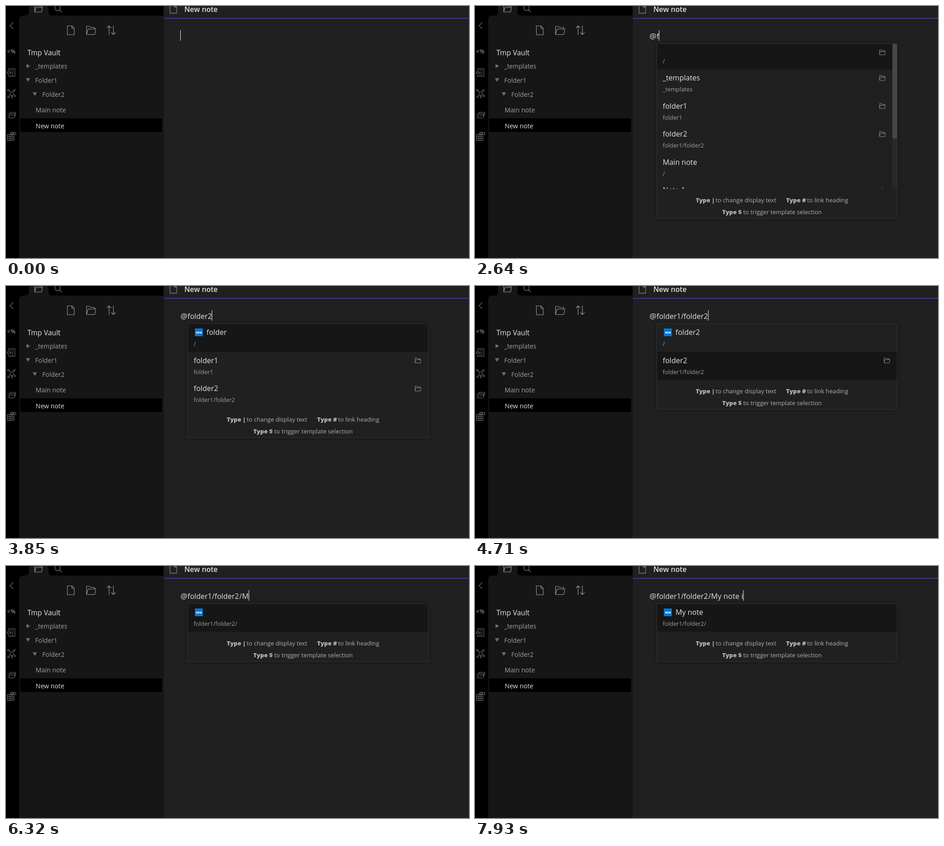
Animation of 1015 by 552 pixels, one loop 8 s. Source, as an HTML page with a canvas:

```html
<!DOCTYPE html>
<html lang="en">
<head>
<meta charset="utf-8">
<title>Note link suggestions</title>
<style>
html, body { margin: 0; width: 100%; height: 100%; overflow: hidden; background: #202020; }
canvas { display: block; }
</style>
</head>
<body>
<canvas id="stage" width="1015" height="552"></canvas>
<script>
const ctx = document.getElementById('stage').getContext('2d');
const FONT = '"Open Sans", "Noto Sans", sans-serif';
const LOOP = 8000, ROW = 61.5, TOP = 82.5;
const BG = '#202020', SIDE = '#161616', BRIGHT = '#e2e3e4', MUTED = '#a0a0a0', DIM = '#707070';

function text(s, x, y, size, color, weight = 400) {
  ctx.font = `${weight} ${size}px ${FONT}`;
  ctx.fillStyle = color;
  ctx.fillText(s, x, y);
  return ctx.measureText(s).width;
}

function box(x, y, w, h, color, r = 0) {
  ctx.fillStyle = color;
  ctx.beginPath();
  ctx.roundRect(x, y, w, h, r);
  ctx.fill();
}

// Strokes (or fills) SVG path data placed at x, y
function icon(d, x, y, color, scale = 1, width = 1.1, fill = false) {
  ctx.save();
  ctx.translate(x, y);
  ctx.scale(scale, scale);
  const p = new Path2D(d);
  if (fill) {
    ctx.fillStyle = color;
    ctx.fill(p);
  } else {
    ctx.strokeStyle = color;
    ctx.lineWidth = width / scale;
    ctx.lineJoin = 'round';
    ctx.stroke(p);
  }
  ctx.restore();
}

const FILE = 'M0 0H10L15 5.5V19.5H0ZM10 0V5.5H15';
const FOLDER = 'M.5 18V1.5Q.5 .5 1.5 .5H7L9 3H18.5V6M.5 18L4 6.5H21L18.5 18.5H1Z';
const SMALL_FOLDER = 'M.5 11V.5H4.5L6 2.5H12V4.5M.5 11L1.5 4.5H13L12 11.5H.5Z';
const SORT = 'M5 20V.5M.5 5L5 .5L9.5 5M14.5 0V19.5M10 15L14.5 19.5L19 15';
const RIGHT = 'M0 0L8 4.5L0 9Z', DOWN = 'M0 0H9.5L4.7 8Z';

function ribbon() {
  icon('M16 36L9 43L16 50', 0, 0, DIM);
  ctx.letterSpacing = '1px';
  text('<%', 2.5, 103.5, 12, '#909090', 600);
  ctx.letterSpacing = '0px';
  icon('M6 142V137.5H19.5V154.5H6V150M9 141H16.5M12 145H16.5M12 148H16.5M9 151.5H16.5M3 144H9V148H3ZM9 146H12', 0, 0, DIM);
  icon('M10 188L6 185M15 188L18 185M16 193L18.5 196M9.5 194L6.5 198M13 196V198', 0, 0, DIM);
  for (const [x, y, r] of [[12.5, 192, 3.8], [5, 184.5, 1.8], [18.5, 184.5, 1.8], [19.5, 197, 1.8], [5.5, 199, 1.8], [13, 199.5, 1.6]]) {
    ctx.beginPath();
    ctx.arc(x, y, r, 0, 7);
    ctx.strokeStyle = DIM;
    ctx.lineWidth = 1.1;
    ctx.stroke();
  }
  icon('M8 236H19.5L17.5 245H6.5ZM8.5 236L9 233H21.5L19.5 242M10 239H17M3.5 236H6M3.5 240H5.5M3.5 244H5', 0, 0, DIM);
  icon('M3.5 281H8.5V294.5M3.5 281V294.5H17.5V285.5H3.5M3.5 290H17.5M13 285.5V294.5M8.5 281H12V285.5M10 279L13 276L16 279L13 282ZM16.5 277H21.5V282H16.5ZM14 283L16 281L18 283', 0, 0, DIM);
}

function sidebar() {
  box(0, 0, 346, 552, '#000');
  box(29, 21, 316.5, 531, SIDE, [8, 0, 0, 0]);
  // Active tab flares out at its foot
  icon('M50 0H93V13Q93 21 101 21V22H42V21Q50 21 50 13Z', 0, 0, SIDE, 1, 0, true);
  icon(FOLDER, 62.5, -2.5, '#a0a0a0', 0.84);
  icon('M119 4A6 6 0 1 1 107 4A6 6 0 1 1 119 4M117.3 8.3L122.5 13.5', 0, 0, '#808080');
  icon(FILE, 134.5, 43.5, '#a0a0a0');
  icon(FOLDER, 176, 44, '#a0a0a0');
  icon(SORT, 221, 43, '#a0a0a0');

  text('Tmp Vault', 47, 107.5, 15.6, BRIGHT, 500);
  icon(RIGHT, 45, 127, '#6c6c6c', 1, 0, true);
  icon(DOWN, 43.5, 158, '#6c6c6c', 1, 0, true);
  icon(DOWN, 58.5, 189, '#6c6c6c', 1, 0, true);
  box(31, 246, 311, 30, '#000', 3);
  text('_templates', 64, 137, 13.8, MUTED);
  text('Folder1', 64, 167.5, 13.8, MUTED);
  text('Folder2', 79.5, 198.5, 13.8, MUTED);
  text('Main note', 65, 232.5, 14.1, MUTED);
  text('New note', 65, 267.5, 14.1, BRIGHT);
}

function header() {
  icon(FILE, 359.5, -3, '#909090', 0.97);
  text('New note', 391, 13, 15.8, BRIGHT, 600);
  box(346, 26, 669, 2, '#43358c');
}

// Rows: [title, path, kind]
const DIR1 = ['folder1', 'folder1', 'dir'];
const DIR2 = ['folder2', 'folder1/folder2', 'dir'];
const ALL = [['', '/', 'dir'], ['_templates', '_templates', 'dir'], DIR1, DIR2,
  ['Main note', '/', 'note'], ['Note 1', 'folder1', 'link']];
const search = q => [[q, '/', 'new'], DIR1, DIR2].filter(r => r[2] === 'new' || r[0].startsWith(q));
const create = s => [[s, 'folder1/folder2/', 'new']];

function badge(x, y) {
  box(x, y, 17.5, 17, '#0078d7');
  text('NEW', x + 2.5, y + 10.6, 5.4, '#fff', 800);
}

function popup(rows, pick) {
  const scroll = rows === ALL;
  const listH = scroll ? 318 : rows.length * ROW;
  const bottom = Math.round(TOP + listH + 65.5);
  ctx.save();
  ctx.shadowColor = 'rgba(0,0,0,.3)';
  ctx.shadowBlur = 8;
  ctx.shadowOffsetY = 2;
  box(398, 82, 528, bottom - 82, '#343434', 4);
  ctx.restore();
  box(399, 83, 526, bottom - 84, BG, 3);

  ctx.save();
  ctx.beginPath();
  ctx.rect(399, 83, 526, listH - 0.5);
  ctx.clip();
  let y = TOP;
  rows.forEach(([title, path, kind], i) => {
    const cut = scroll && !i ? 5.5 : 0;
    const h = ROW - cut;
    if (i === pick) box(399, y, 526, h, SIDE);
    if (kind === 'new') badge(414, 93);
    text(title, kind === 'new' ? 439.5 : 411.5, y + 24.5, 16, BRIGHT);
    text(path, 411.5, y + 48.5 - cut, 12.8, MUTED);
    const right = scroll ? 886.5 : 896.5;
    if (kind === 'dir') icon(SMALL_FOLDER, right, y + 13, '#8c8c8c', 1, 1);
    if (kind === 'link') icon('M6 0L12 5L6 10M12 5H0', right, y + 15, MUTED);
    y += h;
  });
  if (scroll) {
    box(915, 83, 10, 317, '#292929', 4);
    box(915, 83, 10, 207, '#474747', 4);
  }
  ctx.restore();

  const hint = (key, x, s, sx, base) => {
    text(key, x, base, 13, '#b8b8b8', 800);
    text(s, sx, base, 13.1, '#b0b0b0');
  };
  hint('Type |', 484, 'to change display text', 527.5, bottom - 36.5);
  hint('Type #', 682, 'to link heading', 728, bottom - 36.5);
  hint('Type $', 542, 'to trigger template selection', 588, bottom - 10.5);
}

// The line is set in three runs: trigger, folder path, note name
function line(s, caret) {
  const runs = [[s.slice(0, 1), 382.5, 17, 0], [s.slice(1, 16), 398, 15.95, 0], [s.slice(16), 511.5, 16, 0.2]];
  let end = 382;
  for (const [part, x, size, gap] of runs) {
    if (!part) continue;
    ctx.letterSpacing = gap + 'px';
    end = Math.round(x + text(part, x, 71.5, size, BRIGHT));
  }
  ctx.letterSpacing = '0px';
  if (caret) box(end, 53, 1, 23, '#f0f0f0');
}

// Each step: start time and what changes from there on
const PATH = '@folder1/folder2';
const steps = [
  [0, { s: '', caret: 1, rows: null, pick: 0 }],
  [200, { caret: 0 }],
  [660, { caret: 1 }],
  [1190, { caret: 0 }],
  [1260, { s: '@', caret: 1 }],
  [1330, { rows: ALL }],
  [1780, { caret: 0 }],
  [2310, { caret: 1 }],
  [2640, { s: '@f' }],
  [2710, { rows: search('f') }],
  [2780, { s: '@fo' }],
  [2850, { rows: search('fo') }],
  [2920, { s: '@fol' }],
  [3050, { s: '@fold', rows: search('fol') }],
  [3120, { s: '@folde', rows: search('fold') }],
  [3250, { s: '@folder', rows: search('folde') }],
  [3320, { rows: search('folder') }],
  [3780, { caret: 0 }],
  [3850, { s: '@folder2', caret: 1 }],
  [3920, { rows: search('folder2') }],
  [4250, { pick: 1 }],
  [4380, { caret: 0 }],
  [4710, { s: PATH, caret: 1 }],
  [4780, { rows: [DIR2], pick: 0 }],
  [5240, { caret: 0 }],
  [5770, { caret: 1 }],
  [5840, { s: PATH + '/' }],
  [5910, { rows: create('') }],
  [6320, { s: PATH + '/M' }],
  [6390, { rows: create('M') }],
  [6650, { s: PATH + '/My', rows: create('My') }],
  [6850, { s: PATH + '/My ' }],
  [7380, { caret: 0 }],
  [7450, { s: PATH + '/My n', caret: 1 }],
  [7520, { s: PATH + '/My no', rows: create('My n') }],
  [7590, { s: PATH + '/My not', rows: create('My no') }],
  [7660, { s: PATH + '/My note', rows: create('My not') }],
  [7730, { s: PATH + '/My note ', rows: create('My note') }],
  [7930, { s: PATH + '/My note i' }]
];

function frame() {
  const t = performance.now() % LOOP;
  const state = {};
  for (const [at, change] of steps) if (at <= t) Object.assign(state, change);
  box(0, 0, 1015, 552, BG);
  sidebar();
  ribbon();
  box(345.5, 0, 670, 552, BG);
  header();
  line(state.s, state.caret);
  if (state.rows) popup(state.rows, state.pick);
  requestAnimationFrame(frame);
}
frame();
</script>
</body>
</html>
```
